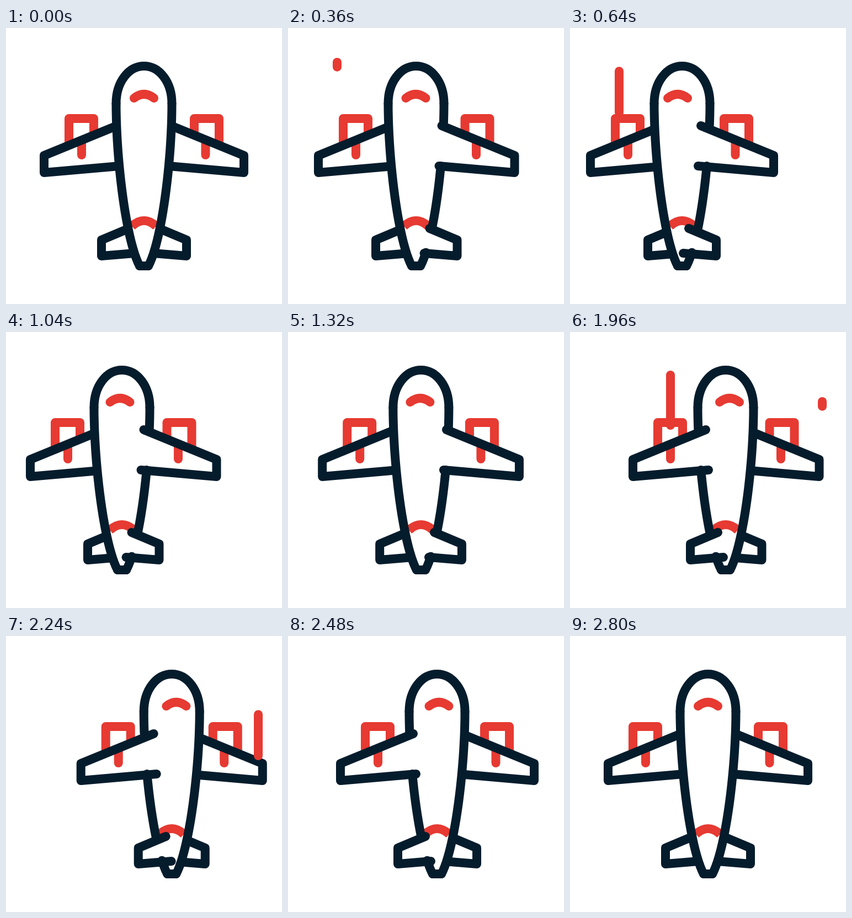
An HTML page for the animation above (3 s loop, 500x500 px).

```html
<!DOCTYPE html>
<html lang="en">
<head>
<meta charset="utf-8">
<title>Banking plane</title>
<style>
  html, body { margin: 0; width: 100%; height: 100%; overflow: hidden; background: #fff; }
  svg { display: block; width: 100vw; height: 100vh; }
  path { fill: none; stroke-width: 16; stroke-linejoin: round; }
  .ink { stroke: #051c2c; stroke-linecap: round; }
  .red { stroke: #e63a32; }
  .cap { stroke-linecap: round; }
</style>
</head>
<body>
<svg id="stage" viewBox="0 0 500 500"></svg>
<script>
const LOOP = 3000, STEP = 40;
const stage = document.getElementById('stage');

function add(parent, tag, attrs = {}) {
  const el = document.createElementNS('http://www.w3.org/2000/svg', tag);
  for (const k in attrs) el.setAttribute(k, attrs[k]);
  return parent.appendChild(el);
}
const line = (parent, cls, d) => add(parent, 'path', { class: cls, d });

// Wing, engine and tail of one side; the right side is the mirror image.
function makeSide(mirror, stemX) {
  const outer = add(stage, 'g');
  const g = add(outer, 'g', mirror ? { transform: 'translate(500 0) scale(-1 1)' } : {});
  line(g, 'red', 'M114 210V164H159V192');
  line(g, 'red cap', `M${stemX} 205V230`);
  line(g, 'ink', 'M201 177L69 231V262L206 250');
  line(g, 'ink', 'M223 363L173 384V413L233 408');
  return outer;
}

// Lower fuselage edge as a cubic, cut into pieces where wing and tail join.
const edgeX = [199.5, 199.5, 217.5, 242], edgeY = [137, 240, 385, 431];
function cubic(p, u) {
  const v = 1 - u;
  return v * v * v * p[0] + 3 * v * v * u * p[1] + 3 * v * u * u * p[2] + u * u * u * p[3];
}
function edge(mirror, a, b) {
  const pts = [];
  for (let i = 0; i <= 24; i++) {
    const u = a + (b - a) * i / 24, x = cubic(edgeX, u);
    pts.push((mirror ? 500 - x : x).toFixed(2) + ' ' + cubic(edgeY, u).toFixed(2));
  }
  return 'M' + pts.join('L');
}
const whole = m => edge(m, 0, 1);
const gapped = m => edge(m, 0, .122) + edge(m, .337, .688) + edge(m, .862, 1);

const left = makeSide(false, 137);
const right = makeSide(true, 138.5);
const body = add(stage, 'g');
const dome = 'M199.5 137C199.5 98 222 69 250 69S300.5 98 300.5 137';
add(body, 'path', {
  d: dome + 'C300.5 240 282.5 385 258 431H242C217.5 385 199.5 240 199.5 137Z',
  style: 'fill:#fff'
});
line(body, 'red', 'M228 359Q250 339 272 359');
line(body, 'ink', dome);
line(body, 'ink', 'M242 431H258');
const leftEdge = line(body, 'ink', '');
const rightEdge = line(body, 'ink', '');
const nose = add(stage, 'g');
line(nose, 'red cap', 'M232 127Q250 113 268 127');

// Air streaks: x, top, bottom, start time
const sky = add(stage, 'g');
const streaks = [[89, 62, 153, 308], [182, 78, 169, 1700], [457, 126, 217, 1908]]
  .map(s => ({ s, el: line(sky, 'red cap', '') }));

// Sideways offsets: time, left, right, body, nose
const keys = [
  [100, 0, 0, 0, 0],
  [360, -14, -20.5, -18, -18.5],
  [640, -32, -62, -47, -55],
  [790, -35, -70, -52.5, -61],
  [1040, -25, -49.5, -40, -43.5],
  [1200, -14, -26, -20, -23],
  [1400, -3.5, -6, -4.5, -5.2],
  [1600, 0, 0, 0, 0],
  [1640, 2, .5, 1.5, 1.7],
  [1760, 13, 5, 9, 11],
  [1960, 45, 20.5, 32, 39],
  [2190, 70, 35, 52.5, 61],
  [2320, 55, 29, 42, 49],
  [2480, 26, 15, 20, 23.5],
  [2640, 5.2, 3, 4, 4.6],
  [2800, 0, 0, 0, 0]
];
const secant = (i, c) => (keys[i + 1][c] - keys[i][c]) / (keys[i + 1][0] - keys[i][0]);
function slope(i, c) {
  if (i === 0 || i === keys.length - 1) return 0;
  const a = secant(i - 1, c), b = secant(i, c);
  return a * b <= 0 ? 0 : 2 * a * b / (a + b);
}
// Monotone Hermite interpolation of one column
function offset(t, c) {
  if (t <= keys[0][0] || t >= keys[keys.length - 1][0]) return 0;
  let i = 0;
  while (t >= keys[i + 1][0]) i++;
  const h = keys[i + 1][0] - keys[i][0], u = (t - keys[i][0]) / h, w = 1 - u;
  return keys[i][c] * (1 + 2 * u) * w * w + keys[i + 1][c] * u * u * (3 - 2 * u) +
    h * (slope(i, c) * u * w * w - slope(i + 1, c) * u * u * w);
}

const ease = u => (1 - Math.cos(Math.PI * Math.min(1, Math.max(0, u)))) / 2;
const shift = (el, x) => el.setAttribute('transform', `translate(${x.toFixed(2)} 0)`);

let pose = null;
function setPose(next) {
  if (next === pose) return;
  pose = next;
  leftEdge.setAttribute('d', next === 'right' ? gapped(false) : whole(false));
  rightEdge.setAttribute('d', next === 'left' ? gapped(true) : whole(true));
  // The side turned towards the viewer lies above the fuselage.
  stage.insertBefore(left, next === 'right' ? nose : body);
  stage.insertBefore(right, next === 'left' ? nose : body);
}

function draw(time) {
  const t = Math.floor(time % LOOP / STEP) * STEP;
  setPose(t < 120 || t >= 2800 ? 'level' : t < 1600 ? 'left' : 'right');
  [left, right, body, nose].forEach((el, i) => shift(el, offset(t, i + 1)));
  for (const { s: [x, top, bottom, start], el } of streaks) {
    const a = top + (bottom - top) * ease((t - start - 260) / 260);
    const b = top + (bottom - top) * ease((t - start) / 260);
    el.setAttribute('d', b - a > .5 ? `M${x} ${a.toFixed(2)}V${b.toFixed(2)}` : '');
  }
}

const begin = performance.now();
function tick() {
  draw(performance.now() - begin);
  requestAnimationFrame(tick);
}
tick();
</script>
</body>
</html>
```
